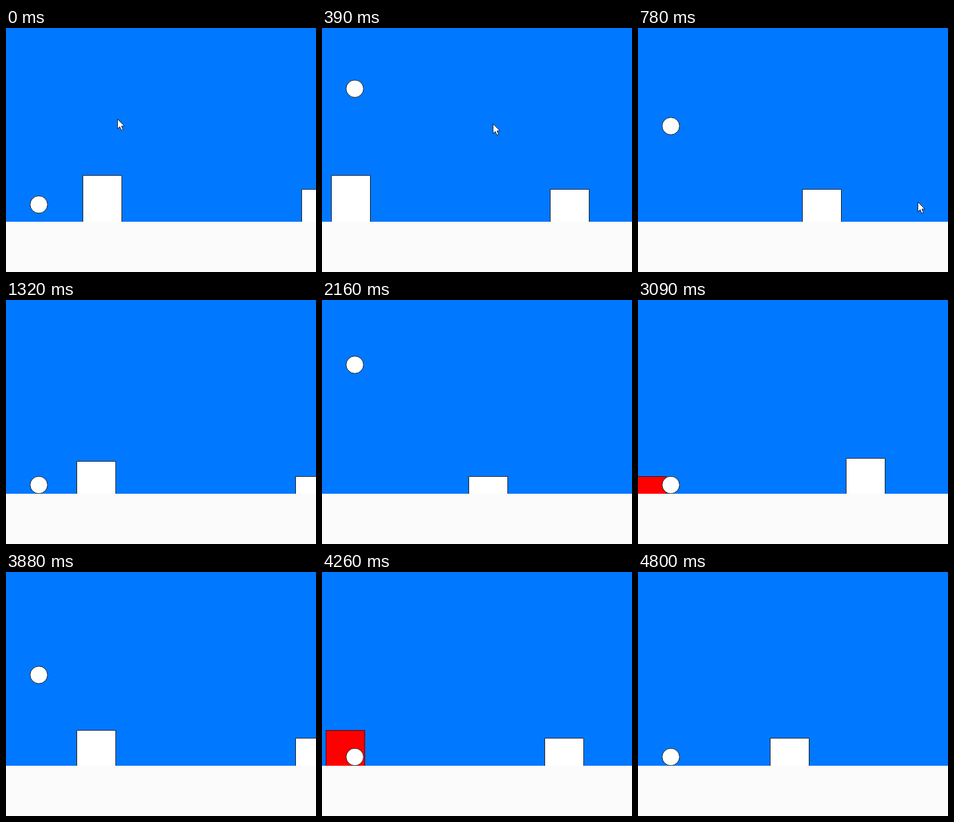
An HTML page with a canvas that plays this animation: 510 by 403 pixels, repeating every 4880 ms.

```html
<!DOCTYPE html>
<html lang="en">
<head>
<meta charset="utf-8">
<title>Jumping ball</title>
<style>
  html, body { margin: 0; width: 100%; height: 100%; overflow: hidden; background: #fbfbfb; }
  canvas { display: block; }
</style>
</head>
<body>
<canvas id="stage" width="510" height="403"></canvas>
<script>
const ctx = document.getElementById('stage').getContext('2d');
const LOOP = 4880, STEPS = 63, GROUND = 320;
const BALL = { x: 54, r: 14.3, rest: 305.5 };
const BLOCK = { width: 64, gap: 360, speed: 4.8, start: 126, heights: [76.5, 53.5, 28.5, 58.5, 45.5] };
const JUMP = { peak: 209.5, gravity: 0.43, rise: 27.95, kick: 2.3, starts: [-0.47, 90.9, 180.5] };
const POINTER = new Path2D('M0 0V16L3.7 12.6 6.3 18.5 9 17.4 6.5 11.6 11.4 11.4Z');

// About 4.5 game ticks pass per displayed step, slightly more in the middle stretch.
function ticksAt(step) {
  const faster = Math.min(10, Math.max(0, step - 40));
  return Math.round(4.5 * step + 0.2 * faster);
}

// A short linear kick, then free flight.
function ballHeight(tick) {
  const age = tick - JUMP.starts.findLast(start => start <= tick);
  const flight = a => JUMP.peak - JUMP.gravity / 2 * (a - JUMP.rise) ** 2;
  return age < JUMP.kick ? flight(JUMP.kick) * age / JUMP.kick : Math.max(0, flight(age));
}

function paint(path, fill) {
  ctx.fillStyle = fill;
  ctx.fill(path);
  ctx.stroke(path);
}

function drawBlocks(tick, ballY) {
  BLOCK.heights.forEach((height, i) => {
    const x = Math.floor(BLOCK.start + i * BLOCK.gap - tick * BLOCK.speed) + 0.5;
    const top = GROUND - height;
    const hit = x < BALL.x + BALL.r && x + BLOCK.width > BALL.x - BALL.r && ballY + BALL.r > top;
    const box = new Path2D();
    box.rect(x, top, BLOCK.width, height + 5);
    paint(box, hit ? '#f00' : '#fff');
  });
}

function drawBall(y) {
  const disc = new Path2D();
  disc.arc(BALL.x, y, BALL.r, 0, Math.PI * 2);
  paint(disc, '#fff');
}

// Speeds up and curves down until it leaves on the right.
function drawPointer(step) {
  const p = (step / 10) ** 1.5;
  ctx.save();
  ctx.translate(183.5 + 277 * p, 150.5 + 137 * p ** 2.75);
  paint(POINTER, '#fff');
  ctx.restore();
}

function draw(step) {
  const tick = ticksAt(step);
  const ballY = BALL.rest - ballHeight(tick);
  ctx.strokeStyle = '#1a1a1a';
  ctx.fillStyle = '#0078ff';
  ctx.fillRect(0, 0, 510, GROUND);
  drawBlocks(tick, ballY);
  drawBall(ballY);
  ctx.fillStyle = '#fbfbfb';
  ctx.fillRect(0, GROUND, 510, 403 - GROUND);
  drawPointer(step);
}

const begin = performance.now();
function loop() {
  const progress = (performance.now() - begin) % LOOP / LOOP;
  draw(Math.min(STEPS - 1, Math.floor(progress * STEPS + 0.15)));
  requestAnimationFrame(loop);
}
loop();
</script>
</body>
</html>
```
